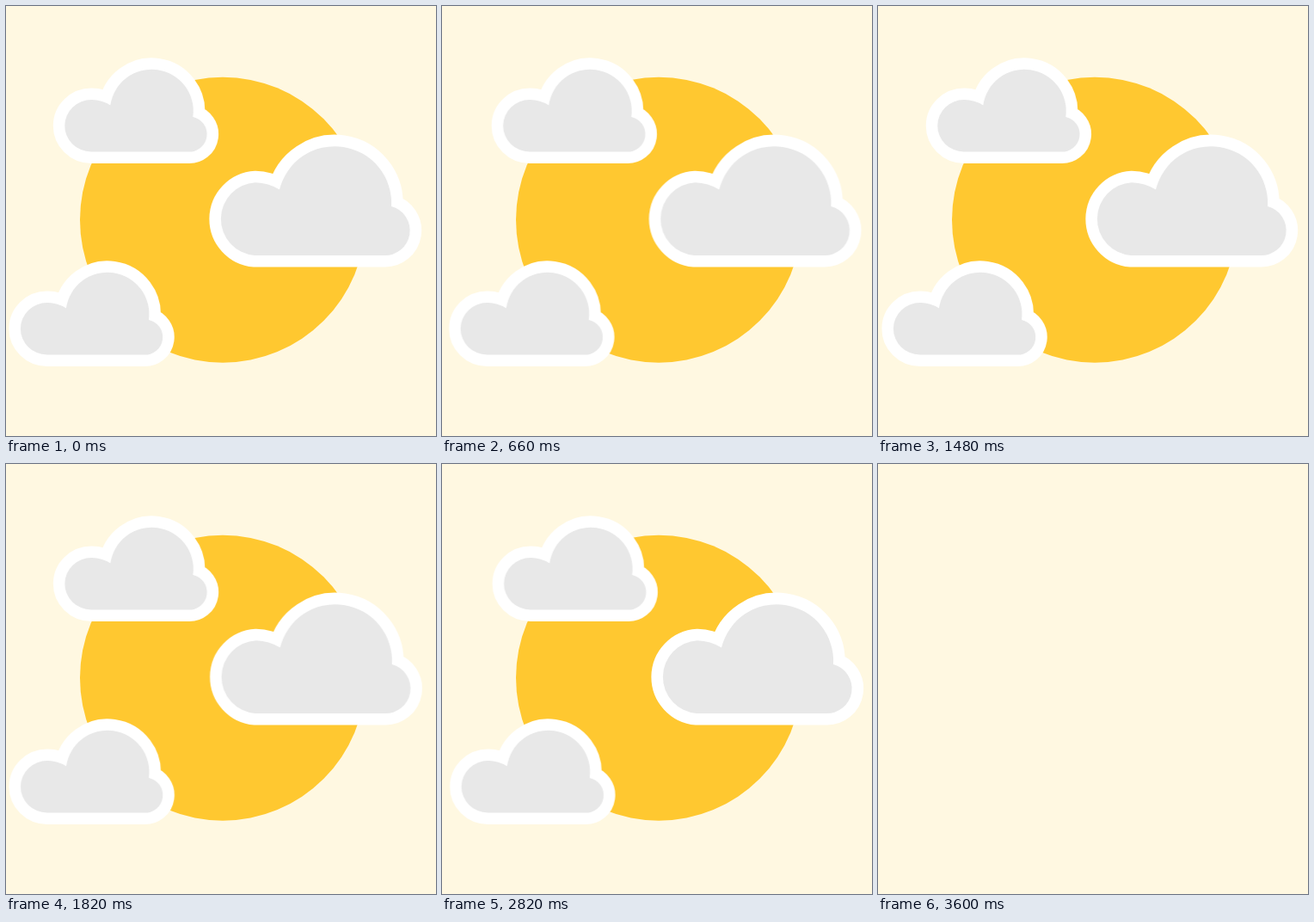
Recreate the animation shown at these times as an HTML page. Size 500x500 px, loop 3620 ms.

```html
<!DOCTYPE html>
<html lang="en">
<head>
<meta charset="utf-8">
<title>Sun and clouds</title>
<style>
  html, body { margin: 0; width: 100%; height: 100%; overflow: hidden; background: #fff8e1; }
  svg { display: block; width: 100%; height: 100%; }
  .cloud { fill: #e8e8e8; stroke: #fff; stroke-width: 27; stroke-linejoin: round; paint-order: stroke; }
</style>
</head>
<body>
<svg viewBox="0 0 500 500">
  <defs>
    <path id="small" d="M99 169.5A31 30.25 0 0 1 99.5 109A39.8 39.8 0 0 1 121.3 115.5A48.4 48.4 0 0 1 217.3 129A20.5 20.5 0 0 1 211.5 169.5Z"/>
    <path id="large" d="M289 290A42.5 42.5 0 0 1 290 205.2A56 56 0 0 1 318 213.5A66 66 0 0 1 448 233A29 29 0 0 1 439 290Z"/>
  </defs>
  <g id="scene">
    <circle cx="252" cy="248.7" r="166" fill="#ffc830"/>
    <g id="top"><use class="cloud" href="#small"/></g>
    <g id="right"><use class="cloud" href="#large"/></g>
    <g id="bottom"><use class="cloud" href="#small" x="-51.4" y="236"/></g>
  </g>
</svg>
<script>
  const LOOP = 3620, END = 3600;
  const timing = { duration: LOOP, iterations: Infinity };
  const ease = 'cubic-bezier(.333, 0, .667, 1)';

  // Each step is [time in ms, horizontal shift in px].
  const drifts = {
    top: [[0, 0], [1000, 3.8], [1700, 0], [2940, 3.8], [END, 0]],
    right: [[0, 0], [1200, 7.5], [1900, 0.5], [3000, 7.5], [END, 0]],
    bottom: [[0, 0], [900, 5.7], [1700, 0], [2820, 5.7], [END, 0]]
  };

  const play = (id, frames) => {
    const anim = document.getElementById(id).animate(frames, timing);
    anim.startTime = document.timeline.currentTime;
  };

  for (const [id, steps] of Object.entries(drifts)) {
    play(id, [...steps, [LOOP, 0]].map(([t, x]) => ({
      offset: t / LOOP, transform: `translateX(${x}px)`, easing: ease
    })));
  }

  // The sky is empty for a moment before the loop restarts.
  play('scene', [
    { offset: 0, opacity: 1, easing: 'step-end' },
    { offset: END / LOOP, opacity: 0, easing: 'step-end' },
    { offset: 1, opacity: 0 }
  ]);
</script>
</body>
</html>
```
